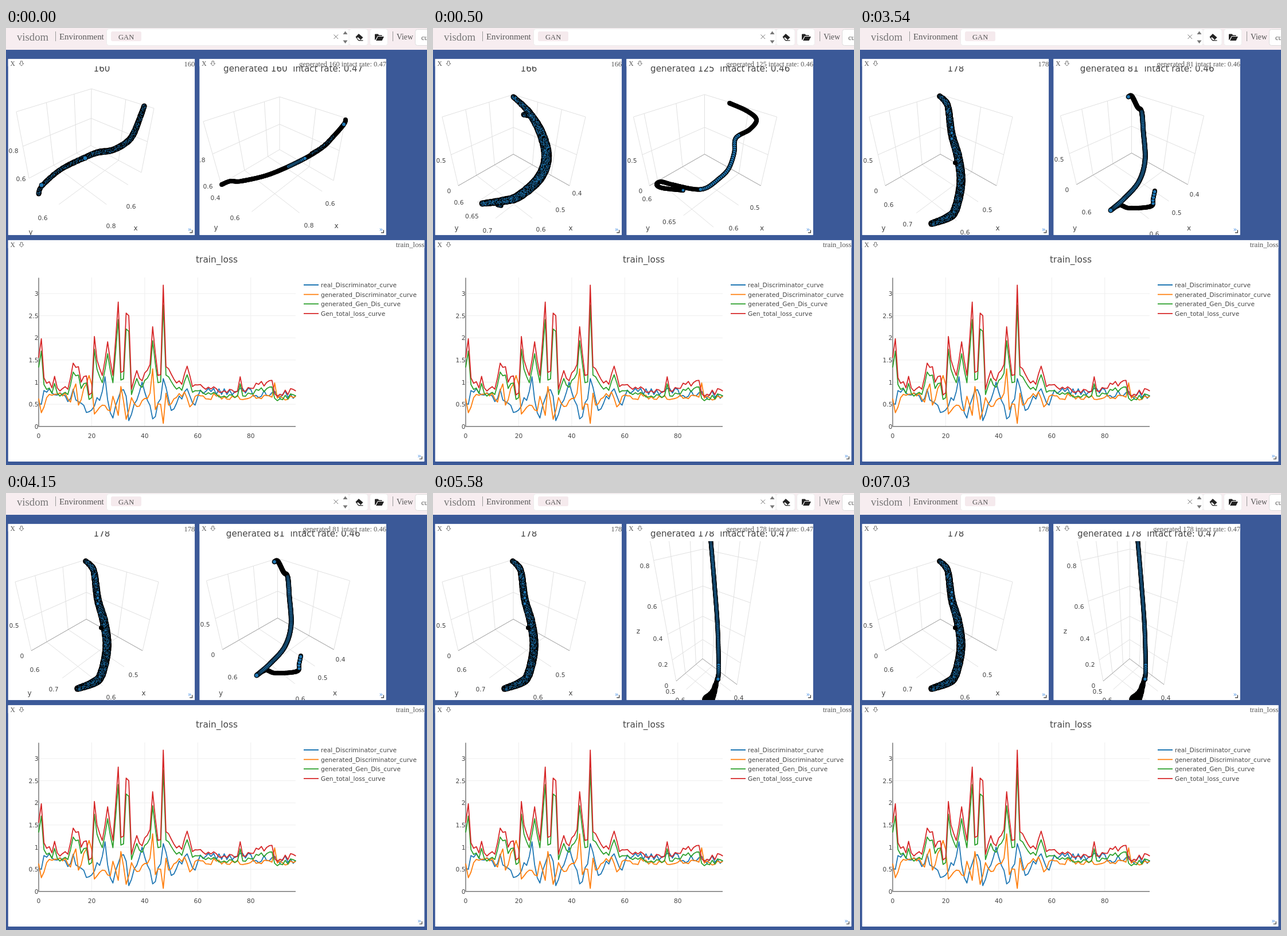
These frames come from a looping animation (734 px wide and 762 px high, 8 s). An HTML page:

```html
<!DOCTYPE html>
<html lang="en">
<head>
<meta charset="utf-8">
<title>Training dashboard</title>
<style>
  html, body { margin: 0; width: 100%; height: 100%; overflow: hidden; background: #3b5998; }
  svg { display: block; }
  text { white-space: pre; }
  .serif { font-family: "Liberation Serif", "Noto Serif", serif; }
  .plot { font-family: "DejaVu Sans", Verdana, sans-serif; fill: #444; }
</style>
</head>
<body>
<svg id="stage" width="734" height="762" viewBox="0 0 734 762"></svg>
<script>
const NS = "http://www.w3.org/2000/svg";
const stage = document.getElementById("stage");
const BLUE = "#1f77b4";

function add(parent, tag, attrs, content) {
  const el = document.createElementNS(NS, tag);
  for (const k in attrs) el.setAttribute(k, attrs[k]);
  if (content !== undefined) el.textContent = content;
  parent.appendChild(el);
  return el;
}
const rect = (p, x, y, width, height, fill, more) =>
  add(p, "rect", { x, y, width, height, fill, ...more });
const line = (p, d, stroke, width = 1, more) =>
  add(p, "path", { d, stroke, "stroke-width": width, fill: "none", ...more });
const shape = (p, d, fill) => add(p, "path", { d, fill });
const serif = (p, x, y, s, size, more) =>
  add(p, "text", { x, y, "font-size": size, class: "serif", fill: "#555", ...more }, s);
const label = (p, x, y, s, size = 10.7, anchor = "middle") =>
  add(p, "text", { x, y, "font-size": size, "text-anchor": anchor, class: "plot" }, s);
const viewport = (p, x, y, width, height) =>
  add(p, "svg", { x, y, width, height, viewBox: [x, y, width, height].join(" ") });
const dot = (p, x, y, r, fill = "#000", more) => add(p, "circle", { cx: x, cy: y, r, fill, ...more });
const bead = (p, x, y, r = 3) => dot(p, x, y, r, BLUE, { stroke: "#000", "stroke-width": 1 });
const mix = (a, b, u) => a.map((p, i) => p + (b[i] - p) * u);
const pathOf = pts => "M" + pts.map(p => p.map(n => n.toFixed(1)).join(" ")).join("L");

function randomizer(seed) {
  let s = seed * 7919;
  return () => (s = (s * 16807) % 2147483647) / 2147483647;
}

// Top bar
function drawBar() {
  rect(stage, 0, 0, 734, 38, "#f7edf0");
  serif(stage, 19, 21.5, "visdom", 18.7, { fill: "#777" });
  line(stage, "M86.5 6V23M674.5 6V23", "#999");
  serif(stage, 93, 20, "Environment", 14.9);
  const box = { rx: 4, stroke: "#ececec" };
  rect(stage, 175.5, 1.5, 423, 29, "#fff", box);
  rect(stage, 598, 1.5, 33, 29, "#fff", box);
  rect(stage, 634.5, 1.5, 31, 29, "#fff", box);
  rect(stage, 713.5, 2.5, 30, 28, "#fff", { rx: 4, stroke: "#ddd" });
  rect(stage, 183, 6, 53, 17, "#f5eaed", { rx: 3 });
  serif(stage, 196, 20, "GAN", 12.6);
  line(stage, "M571.5 11.5L579 19M579 11.5L571.5 19", "#777");
  shape(stage, "M587.5 11L591.5 5.5L595.5 11ZM587.5 21.5L591.5 27L595.5 21.5Z", "#777");
  shape(stage, "M609.5 15.5L615 10L622.5 16.5L617 22H614Z", "#222");
  shape(stage, "M612 17.5L613.5 16L618 20L617 21H615Z", "#fff");
  line(stage, "M615 21.8H622.5", "#222", 1.2);
  shape(stage, "M643 21V11.5Q643 10.5 644 10.5H648.5L650.5 12.5H655Q656 12.5 656 14H648L644.5 20ZM645 22L648.5 15H659L655.5 22Z", "#222");
  serif(stage, 681, 20, "View", 13.7);
  serif(stage, 724, 21, "current", 12.6);
}

// White window with its header and resize mark
function makePane(x, y, w, h, headHeight) {
  const pane = viewport(stage, x, y, w, h);
  rect(pane, x, y, w, h, "#fff", { rx: 1 });
  const body = add(pane, "g", {});
  rect(pane, x, y, w, headHeight, "#fff");
  serif(pane, x + 4, y + 12, "X", 11.5);
  line(pane, `M${x + 21.8} ${y + 4}h3.4v4h2.2l-3.9 4.3l-3.9 -4.3h2.2z`, "#666", 0.9);
  const r = x + w, b = y + h;
  serif(pane, r - 12, b - 7, "»", 12, { fill: "#4a90e2" });
  line(pane, `M${r - 4.5} ${b - 9}V${b - 4.5}H${r - 9}`, "#333", 1.2);
  return { pane, body, x, y, w, h };
}

// Points at even steps on a smooth curve through the knots
function trace(knots, step) {
  const out = [];
  const at = i => knots[Math.max(0, Math.min(knots.length - 1, i))];
  for (let i = 0; i < knots.length - 1; i++) {
    const [a, b, c, d] = [at(i - 1), at(i), at(i + 1), at(i + 2)];
    const n = Math.max(1, Math.round(Math.hypot(c[0] - b[0], c[1] - b[1]) / step));
    for (let k = 0; k < n; k++) {
      const u = k / n;
      out.push(b.map((p, j) => 0.5 * (2 * p + (c[j] - a[j]) * u +
        (2 * a[j] - 5 * p + 4 * c[j] - d[j]) * u * u +
        (3 * p - a[j] - 3 * c[j] + d[j]) * u * u * u)));
    }
  }
  out.push(knots[knots.length - 1]);
  return out;
}

// Thick cloud of points: dark body with blue specks; knots are [x, y, radius]
function cloud(p, knots, density, seed) {
  const rnd = randomizer(seed);
  let d = "";
  for (const [x, y, r] of trace(knots, 1.5)) {
    dot(p, x, y, r - 0.4 + (rnd() - 0.5) * 0.7);
    for (let k = 0; k < r * density; k++) {
      const a = rnd() * 6.283, q = Math.sqrt(rnd()) * (r - 1.6);
      d += `M${(x + q * Math.cos(a)).toFixed(1)} ${(y + q * Math.sin(a)).toFixed(1)}h.01`;
    }
  }
  line(p, d, BLUE, 1.1, { "stroke-linecap": "round" });
}

// Thin chain of points: solid where dense, beads on the span [from, to]
function chain(p, knots, from, to, gap = 2, r = 3.9) {
  const pts = trace(knots, 1.2);
  pts.forEach(([x, y]) => dot(p, x, y, r));
  const n = pts.length - 1;
  for (let i = Math.round(from * n); i <= to * n; i += gap) bead(p, ...pts[i], r - 0.6);
}

// Two walls and a floor seen in perspective, with grid lines at given fractions
function room(p, { left, top, right, origin, leftFoot, rightFoot, front }, u, w, v, axisColor) {
  const edge = (...pts) => line(p, pathOf(pts), "#e0e0e0");
  edge(left, top, right);
  edge(left, leftFoot);
  edge(top, origin);
  edge(right, rightFoot);
  for (const k of v) edge(mix(left, leftFoot, k), mix(top, origin, k), mix(right, rightFoot, k));
  for (const k of u) edge(mix(left, top, k), mix(leftFoot, origin, k), mix(front, rightFoot, k));
  for (const k of w) edge(mix(top, right, k), mix(origin, rightFoot, k), mix(leftFoot, front, k));
  line(p, pathOf([leftFoot, origin, rightFoot]), axisColor);
}
const cube = (dx, dy) => {
  const at = (x, y) => [x + dx, y + dy];
  return { left: at(16, 155), top: at(140, 116), right: at(266, 155), origin: at(140, 220),
    leftFoot: at(44, 275), rightFoot: at(238, 275), front: at(141, 360) };
};

function makeScene(win, { title, head = title, labels, draw }) {
  const g = add(win.body, "g", {});
  const tag = add(win.pane, "g", {});
  label(g, win.x + 163.5, 76, title, 15.1);
  const view = viewport(g, win.x, 84, win.w, 277);
  draw(view);
  for (const [s, x, y] of labels) label(view, x, y, s, /[xyz]/.test(s) ? 12 : 10.7);
  serif(tag, win.x + win.w, 66.5, head, 12.5, { "text-anchor": "end" });
  return on => [g, tag].forEach(e => e.setAttribute("display", on ? "inline" : "none"));
}
const generated = (count, rate) => ({
  title: `generated ${count}  intact rate: ${rate}`,
  head: `generated ${count} intact rate: ${rate}`
});

drawBar();
const left = makePane(3.5, 53.8, 325.7, 307.5, 13);
const right = makePane(337.2, 53.8, 325.7, 307.5, 13);
const names = dx => [["x", 240 + dx, 353], ["y", 41 + dx, 353]];
const AXIS = "#999", FAINT = "#e0e0e0";

const leftScenes = [
  makeScene(left, {
    title: "160",
    labels: [["0.8", 13, 218], ["0.6", 26, 267], ["0.6", 64, 335], ["0.6", 218, 315], ["0.8", 183, 349], ["x", 226, 353], ["y", 43, 360]],
    draw(v) {
      room(v, { left: [18, 146], top: [149, 106], right: [258, 140], origin: [148, 205],
        leftFoot: [40, 262], rightFoot: [236, 252], front: [135, 345] }, [0.4, 0.77], [0.55], [0.52], FAINT);
      cloud(v, [[57, 289, 4.8], [63, 275, 4.8], [95, 247, 5], [137, 226, 5.5], [160, 217, 6],
        [185, 213, 6], [208, 201, 6], [222, 185, 6], [236, 150, 5.5], [241, 136, 5]], 0.7, 11);
      bead(v, 62, 274, 4);
      bead(v, 138, 227, 4);
    }
  }),
  makeScene(left, {
    title: "166",
    labels: [["0.5", 14, 235], ["0", 28, 288], ["0.6", 45, 308], ["0.65", 68, 332], ["0.7", 95, 357], ["0.6", 188, 355],
      ["0.5", 222, 321], ["0.4", 251, 292], ...names(0)],
    draw(v) {
      room(v, cube(0, 0), [0.33, 0.66], [0.34, 0.67], [0.55], AXIS);
      cloud(v, [[158, 151, 5], [168, 153, 5]], 1.2, 5);
      cloud(v, [[113, 308, 5], [119, 310, 4]], 1.2, 6);
      cloud(v, [[140, 120, 5], [165, 144, 6.5], [188, 182, 8.5], [198, 225, 9.5],
        [185, 262, 9.5], [150, 293, 8.5], [125, 301, 7.5], [86, 306, 5.8]], 1.4, 21);
    }
  }),
  makeScene(left, {
    title: "178",
    labels: [["0.5", 14, 235], ["0", 28, 288], ["0.6", 50, 312], ["0.7", 83, 346], ["0.6", 183, 360], ["0.5", 222, 321], ...names(0)],
    draw(v) {
      room(v, cube(0, 0), [0.28, 0.67], [0.56], [0.55], AXIS);
      cloud(v, [[139, 119, 5], [148, 127, 6], [154, 140, 6.3], [160, 185, 7], [171, 225, 7.8],
        [176, 270, 8], [166, 317, 8], [152, 331, 7.8], [125, 341, 6]], 1.1, 31);
      dot(v, 166, 235, 4);
      for (let y = 173; y < 200; y += 10) bead(v, 160, y);
    }
  })
];

const rightScenes = [
  makeScene(right, {
    ...generated(160, 0.47),
    labels: [["0.8", 339, 234], ["0.6", 352, 280], ["0.4", 365, 300], ["0.6", 399, 335], ["0.6", 565, 310], ["0.8", 528, 348], ["x", 576, 349], ["y", 366, 352]],
    draw(v) {
      room(v, { left: [344, 163], top: [477, 120], right: [592, 157], origin: [477, 212],
        leftFoot: [375, 272], rightFoot: [571, 266], front: [472, 360] }, [0.4, 0.8], [0.55], [0.52], FAINT);
      chain(v, [[376, 273], [391, 267], [410, 267], [460, 255], [516, 230], [552, 208],
        [570, 190], [589, 168], [592, 160]], 0.48, 0.61);
      cloud(v, [[533, 219, 4], [552, 207, 4], [570, 190, 4]], 0.5, 9);
      dot(v, 589, 168, 3, BLUE);
    }
  }),
  makeScene(right, {
    ...generated(125, 0.46),
    labels: [["0.5", 347, 235], ["0", 362, 288], ["0.6", 373, 302], ["0.65", 412, 342], ["0.6", 524, 353], ["0.5", 561, 317], ...names(333.5)],
    draw(v) {
      room(v, cube(333.5, 0), [0.15, 0.6], [0.61], [0.55], AXIS);
      chain(v, [[517, 131], [548, 145], [564, 160], [552, 177], [528, 192], [525, 218], [515, 246], [497, 264],
        [476, 279], [455, 281], [417, 273], [397, 268], [390, 273], [400, 279], [436, 283]], 0.28, 0.64, 3);
      bead(v, 436, 283);
    }
  }),
  makeScene(right, {
    ...generated(81, 0.46),
    labels: [["0.5", 347, 233], ["0", 361, 286], ["0.6", 395, 325], ["0.4", 583, 294], ["0.5", 552, 326], ["0.6", 513, 363], ...names(333.5)],
    draw(v) {
      room(v, cube(333.5, -2), [0.3, 0.66], [0.56], [0.55], AXIS);
      chain(v, [[437, 318], [453, 309], [470, 314], [507, 311], [511, 298], [514, 284]], 0.78, 1, 4);
      chain(v, [[468, 120], [474, 119], [484, 138], [491, 146], [494, 180], [497, 230],
        [486, 268], [460, 298], [437, 318]], 0.17, 1, 2, 4.4);
      bead(v, 468, 120, 3.4);
    }
  }),
  makeScene(right, {
    ...generated(178, 0.47),
    labels: [["0.8", 369, 131], ["0.6", 382, 202], ["0.4", 392, 258], ["0.2", 401, 303], ["0", 407, 340], ["0.5", 414, 350],
      ["0.6", 431, 365], ["0.4", 533, 361], ["z", 358, 245]],
    draw(v) {
      room(v, { left: [375, 65], top: [471, 50], right: [574, 65], origin: [470, 289],
        leftFoot: [424, 328], rightFoot: [530, 334], front: [487, 380] }, [0.35, 0.75], [0.28, 0.65], [0.2, 0.47, 0.69, 0.86], AXIS);
      cloud(v, [[497, 318, 4], [493, 334, 5], [488, 349, 7], [480, 361, 11]], 0, 41);
      chain(v, [[484, 80], [490, 150], [496, 230], [498, 300], [497, 325]], 0, 1);
    }
  })
];

// Curve through [step, hundredths] keys with seeded jitter between them
function series(keys, jitter, seed) {
  const rnd = randomizer(seed);
  return Array.from({ length: 98 }, (_, i) => {
    const k = Math.max(1, keys.findIndex(key => key[0] >= i));
    const [a, b] = [keys[k - 1], keys[k]];
    const value = a[1] + (b[1] - a[1]) * (i - a[0]) / (b[0] - a[0]);
    const noise = (rnd() * 2 - 1) * jitter;
    return i === a[0] || i === b[0] ? value : value + noise;
  });
}
const total = series([[0, 155], [1, 198], [2, 110], [5, 87], [6, 113], [7, 87], [11, 84], [13, 143], [15, 135], [16, 100],
  [18, 114], [19, 71], [20, 76], [21, 203], [22, 150], [24, 115], [26, 191], [28, 115], [30, 281], [31, 122], [32, 125],
  [33, 256], [34, 250], [35, 84], [37, 126], [39, 103], [42, 140], [43, 225], [45, 115], [46, 117], [47, 319], [48, 135],
  [52, 98], [54, 95], [56, 136], [58, 90], [75, 80], [76, 112], [77, 80], [88, 104], [89, 74], [97, 80]], 7, 3);
const real = series([[0, 52], [1, 50], [2, 81], [12, 63], [13, 84], [14, 60], [19, 33], [20, 37], [24, 79], [25, 112],
  [26, 60], [28, 19], [31, 81], [33, 68], [34, 13], [36, 50], [39, 100], [43, 17], [46, 62], [47, 108], [50, 36],
  [56, 85], [59, 48], [61, 82], [97, 70]], 10, 8);
const fake = series([[0, 63], [1, 31], [3, 65], [10, 75], [12, 55], [14, 96], [15, 48], [19, 115], [20, 95], [21, 28],
  [24, 48], [27, 35], [28, 68], [30, 25], [31, 90], [33, 16], [35, 65], [37, 45], [42, 75], [43, 130], [44, 38],
  [46, 50], [47, 7], [48, 75], [49, 48], [55, 78], [57, 44], [59, 68], [88, 66], [89, 98], [90, 64], [97, 68]], 7, 5);
const genDis = total.map(v => v - 10 - 0.14 * (v - 70));

function drawLoss() {
  const win = makePane(3.5, 369.8, 726.2, 386.2, 14), g = win.body;
  const px = i => 57 + i * 4.622, py = v => 694.7 - v * 0.772;
  serif(win.pane, 729.5, 382, "train_loss", 12.8, { "text-anchor": "end" });
  label(g, 367.5, 409, "train_loss", 15.3);
  for (let v = 0; v <= 300; v += 50) {
    if (v) line(g, `M57 ${py(v)}H505`, "#eee");
    label(g, 56.5, py(v) + 4, v / 100, 10.7, "end");
  }
  for (let i = 0; i <= 80; i += 20) {
    if (i) line(g, `M${px(i)} 435V695`, "#eee");
    label(g, px(i), 715, i);
  }
  line(g, "M57 435.5V695M57 694.7H505", "#777", 1.5);
  const curves = [
    ["real_Discriminator_curve", BLUE, real],
    ["generated_Discriminator_curve", "#ff7f0e", fake],
    ["generated_Gen_Dis_curve", "#2ca02c", genDis],
    ["Gen_total_loss_curve", "#d62728", total]];
  curves.forEach(([name, color, data], k) => {
    line(g, pathOf(data.map((v, i) => [px(i), py(v)])), color, 1.8, { "stroke-linejoin": "round" });
    const y = 448 + k * 16.6;
    line(g, `M519 ${y}H545`, color, 1.8);
    label(g, 549, y + 4, name, 10.65, "start");
  });
}
drawLoss();

const LOOP = 8000;
const cuts = [500, 3540, 5580];

function render(time) {
  const t = time % LOOP;
  const step = cuts.filter(c => t >= c).length;
  rightScenes.forEach((show, i) => show(i === step));
  leftScenes.forEach((show, i) => show(i === Math.min(step, 2)));
}

const start = performance.now();
function tick() {
  render(performance.now() - start);
  requestAnimationFrame(tick);
}
tick();
</script>
</body>
</html>
```
